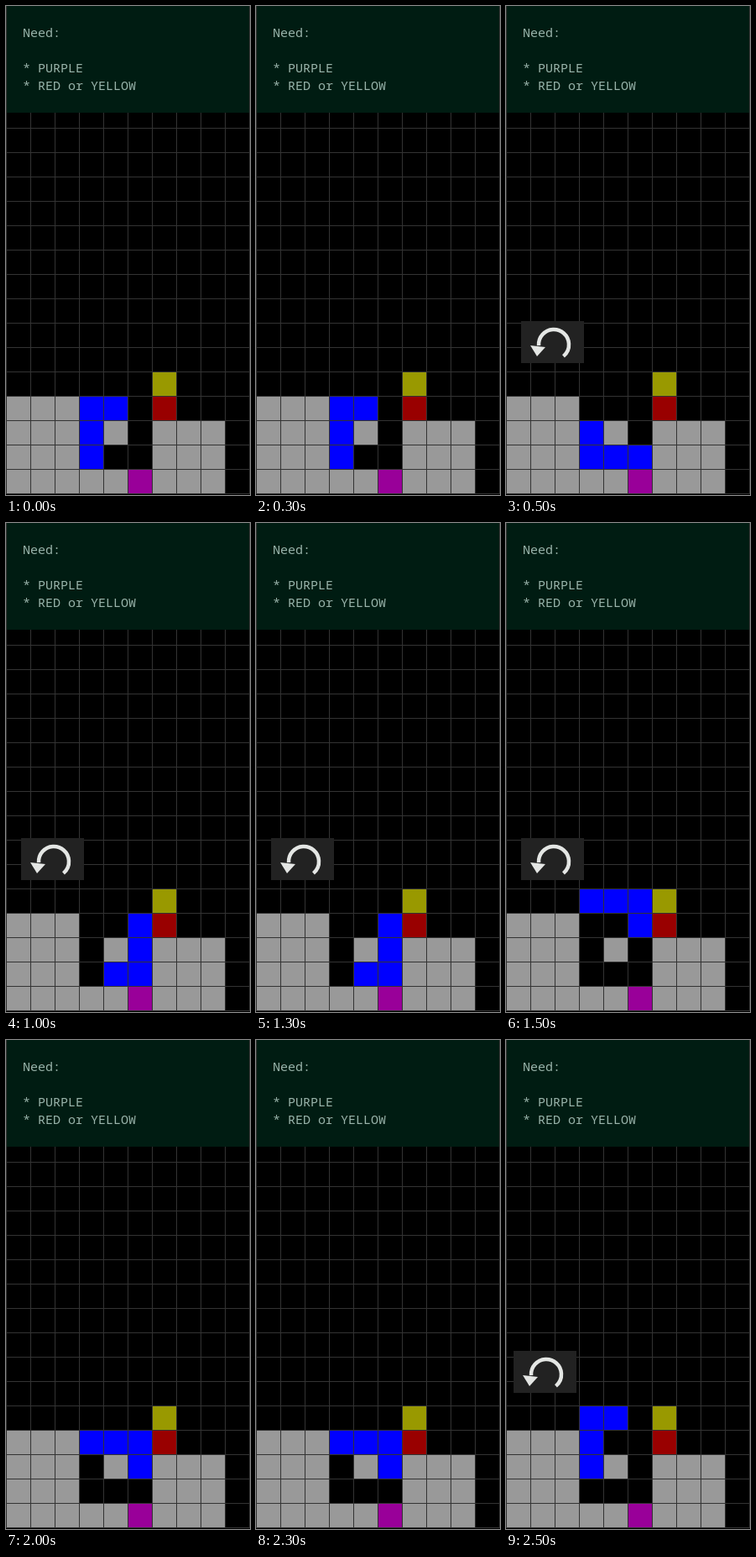
These frames come from a looping animation (291x582 px, 3 s). An HTML page with a canvas:

```html
<!DOCTYPE html>
<html lang="en">
<head>
<meta charset="utf-8">
<style>
  html, body { margin: 0; width: 100%; height: 100%; overflow: hidden; background: #000; }
  canvas { display: block; }
</style>
</head>
<body>
<canvas id="stage" width="291" height="582"></canvas>
<script>
const ctx = document.getElementById('stage').getContext('2d');
const W = 291, H = 582, CELL = 29, STEP = 500;

// Cells are "column row" digit pairs, with row 0 at the bottom.
const poses = [
  { piece: '33 43 32 31' },
  { piece: '32 31 41 51', icon: [18, 375] },
  { piece: '53 52 51 41', icon: [18, 375] },
  { piece: '34 44 54 53', icon: [18, 375] },
  { piece: '33 43 53 52' },
  { piece: '34 44 33 32', icon: [9, 370] },
];

function rect(color, x, y, w, h) {
  ctx.fillStyle = color;
  ctx.fillRect(x, y, w, h);
}

function block(color, col, row, cols = 1, rows = 1) {
  for (let c = col; c < col + cols; c++)
    for (let r = row; r < row + rows; r++)
      rect(color, c * CELL + 1, 552 - r * CELL, CELL - 1, CELL - 1);
}

function drawGrid() {
  for (let x = 0; x < W; x += CELL) rect('#333', x, 0, 1, H - 1);
  for (let y = 580; y > 0; y -= CELL) rect('#333', 0, y, W, 1);
}

function drawStack() {
  const gray = '#999';
  block(gray, 0, 0, 3, 4);
  block(gray, 3, 0, 2, 1);
  block(gray, 4, 2);
  block(gray, 6, 0, 3, 3);
  block('#909', 5, 0);
  block('#900', 6, 3);
  block('#990', 6, 4);
}

function drawPanel() {
  rect('#001c12', 1, 0, W - 2, 127);
  ctx.fillStyle = '#99b3aa';
  ctx.font = '15px "Noto Sans Mono", "DejaVu Sans Mono", monospace';
  ctx.fillText('Need:', 20, 37);
  ctx.fillText('* PURPLE', 20, 79);
  ctx.fillText('* RED or YELLOW', 20, 100);
}

function drawRotateIcon(x, y) {
  ctx.save();
  ctx.translate(x, y);
  rect('#222', 0, 0, 75, 50);
  ctx.strokeStyle = ctx.fillStyle = '#e4e6e4';
  ctx.lineWidth = 4.5;
  ctx.beginPath();
  ctx.arc(39, 28, 18, Math.PI * 0.98, Math.PI * 2.28);
  ctx.stroke();
  ctx.beginPath();
  ctx.moveTo(11, 29);
  ctx.lineTo(29, 31);
  ctx.lineTo(19, 42);
  ctx.fill();
  ctx.restore();
}

function draw(now) {
  const { piece, icon } = poses[Math.floor(now / STEP) % poses.length];
  rect('#000', 0, 0, W, H);
  drawGrid();
  drawStack();
  for (const [col, row] of piece.split(' ')) block('#00f', +col, +row);
  drawPanel();
  if (icon) drawRotateIcon(...icon);
  requestAnimationFrame(draw);
}
requestAnimationFrame(draw);
</script>
</body>
</html>
```
